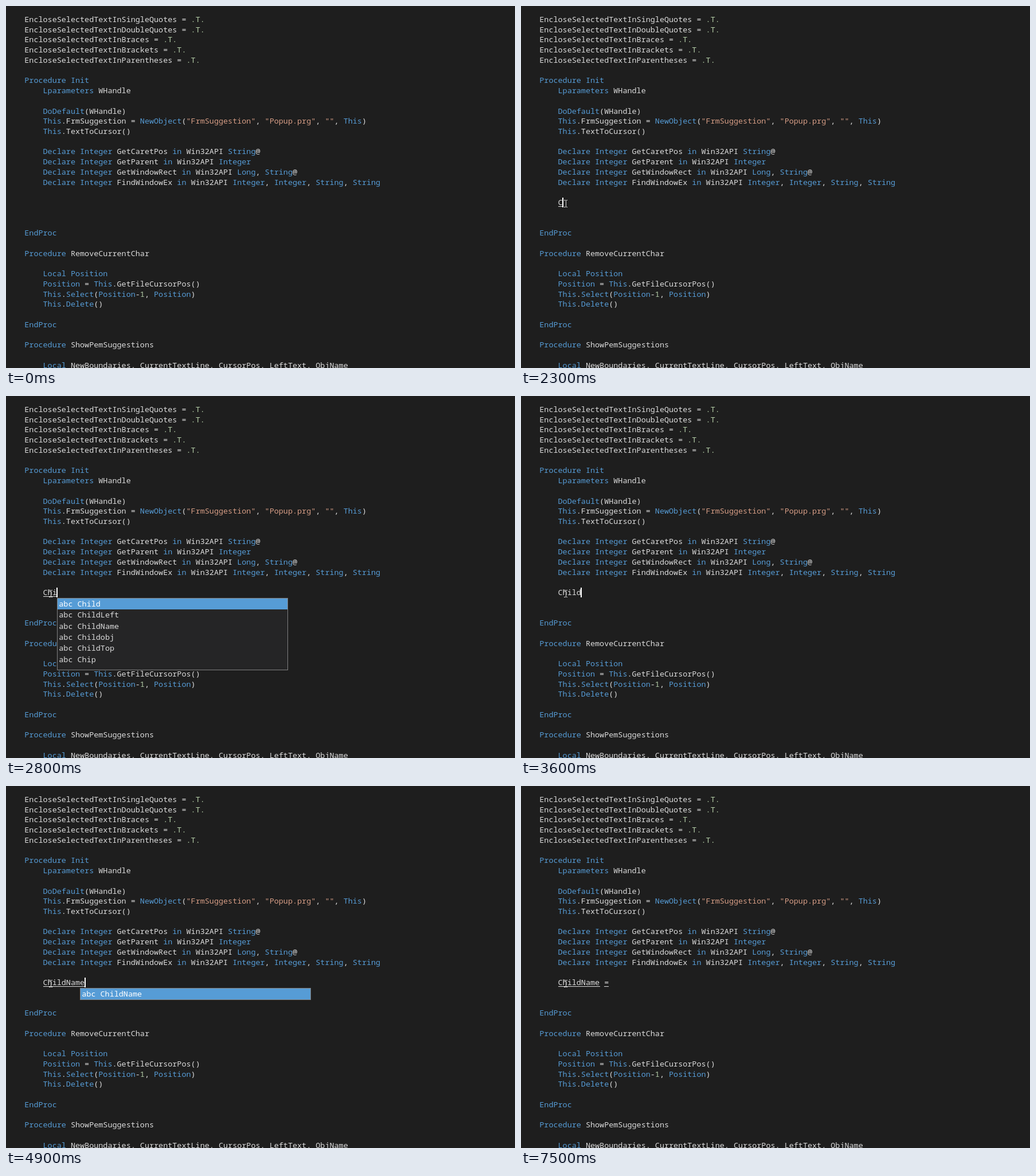
An HTML page with a canvas that plays this animation: 888x631 px, repeating every 8 s.

```html
<!DOCTYPE html>
<html lang="en">
<head>
<meta charset="utf-8">
<title>Editor autocomplete</title>
<style>
html, body { margin: 0; width: 100%; height: 100%; overflow: hidden; background: #1e1e1e; }
canvas { display: block; }
</style>
</head>
<body>
<canvas id="stage" width="888" height="631"></canvas>
<script>
const ctx = document.getElementById('stage').getContext('2d');
const LOOP = 8000, CELL = 8.064, LEFT = 32.26, PITCH = 17.73, INDENT = 64.5;
const PLAIN = '#dcdcdc', BLUE = '#569cd6', STRING = '#d69d85', NUMBER = '#b5cea8';

const code = `EncloseSelectedTextInSingleQuotes = .T.
EncloseSelectedTextInDoubleQuotes = .T.
EncloseSelectedTextInBraces = .T.
EncloseSelectedTextInBrackets = .T.
EncloseSelectedTextInParentheses = .T.

Procedure Init
    Lparameters WHandle

    DoDefault(WHandle)
    This.FrmSuggestion = NewObject("FrmSuggestion", "Popup.prg", "", This)
    This.TextToCursor()

    Declare Integer GetCaretPos in Win32API String@
    Declare Integer GetParent in Win32API Integer
    Declare Integer GetWindowRect in Win32API Long, String@
    Declare Integer FindWindowEx in Win32API Integer, Integer, String, String




EndProc

Procedure RemoveCurrentChar

    Local Position
    Position = This.GetFileCursorPos()
    This.Select(Position-1, Position)
    This.Delete()

EndProc

Procedure ShowPemSuggestions

    Local NewBoundaries, CurrentTextLine, CursorPos, LeftText, ObjName`.split('\n');

const keywords = new Set(('Procedure Init Lparameters DoDefault This NewObject Declare Integer ' +
  'in String Long EndProc Local Position Select Delete').split(' '));
const words = 'c Case Catch Ceiling cha CharRight Child ChildLeft ChildName Childobj ChildTop Chip'.split(' ');

// time, typed text, underlined [from, to], caret shown, popup column (0 = none), popup rows, first word
const states = [
  [0, '', 0, 0, 0],
  [1400, '', 0, 1, 0],
  [1900, '', 0, 0, 0],
  [2300, 'C', [0, 1], 1, 0],
  [2400, 'C', [0, 1], 1, 1, 10, 'c'],
  [2600, 'Ch', [0, 2], 1, 1, 10, 'c'],
  [2800, 'Chi', [0, 3], 1, 3, 6, 'Child'],
  [3200, 'Chil', [0, 4], 1, 3, 5, 'Child'],
  [3500, 'Child', [0, 5], 1, 0],
  [3600, 'Child', 0, 1, 0],
  [4200, 'Child', 0, 0, 0],
  [4600, 'ChildN', [0, 6], 1, 0],
  [4700, 'ChildNa', [0, 7], 1, 7, 1, 'ChildName'],
  [4800, 'ChildNam', [0, 8], 1, 8, 1, 'ChildName'],
  [4900, 'ChildName', [0, 9], 1, 8, 1, 'ChildName'],
  [5100, 'ChildName', [0, 9], 1, 9, 1, 'ChildName'],
  [5600, 'ChildName', [0, 9], 1, 0],
  [5700, 'ChildName ', [0, 9], 1, 0],
  [5800, 'ChildName =', [0, 9], 1, 0],
  [5900, 'ChildName = ', [0, 9], 1, 0],
  [6000, 'ChildName = ', [0, 9, 10, 11], 1, 0],
  [6600, 'ChildName = ', [0, 9, 10, 11], 0, 0],
  [7000, 'ChildName = ', [0, 9, 10, 11], 1, 0],
  [7500, 'ChildName = ', [0, 9, 10, 11], 0, 0]
];

function rect(x, y, w, h, color) {
  ctx.fillStyle = color;
  ctx.fillRect(x, y, w, h);
}

function write(text, x, y, color) {
  ctx.fillStyle = color;
  ctx.fillText(text, x, y);
}

function colorOf(token) {
  if (token[0] === '"') return STRING;
  if (token === '.T.' || /^\d+$/.test(token)) return NUMBER;
  return keywords.has(token) ? BLUE : PLAIN;
}

function drawCode() {
  code.forEach((line, row) => {
    const y = Math.round(28 + PITCH * row);
    for (const m of line.matchAll(/"[^"]*"|\.T\.|\w+|[^\w\s]/g))
      write(m[0], LEFT + m.index * CELL, y, colorOf(m[0]));
  });
}

function arrow(x, y, dir) {
  ctx.fillStyle = '#000';
  ctx.beginPath();
  ctx.moveTo(x - 3.5, y - 2 * dir);
  ctx.lineTo(x + 3.5, y - 2 * dir);
  ctx.lineTo(x, y + 2 * dir);
  ctx.fill();
}

function button(x, y, h) {
  rect(x, y, 14, h, '#808080');
  rect(x, y, 13, h - 1, '#fff');
  rect(x + 1, y + 1, 12, h - 2, '#f4f4f4');
}

function drawScrollbar(x, top, bottom) {
  rect(x, top, 14, bottom - top, '#f8f8f8');
  button(x, top, 14);
  button(x, top + 14, 17);
  button(x, bottom - 14, 14);
  arrow(x + 6.5, top + 7, -1);
  arrow(x + 6.5, bottom - 7, 1);
}

function drawPopup(col, rows, first) {
  const x = Math.round(INDENT + col * CELL), y = 352, w = 403, h = rows * 21;
  const scrolls = rows === 10;
  rect(x, y, w, h, '#808080');
  rect(x + 1, y + 1, w - 2, h - 2, '#252526');
  rect(x + 1, y + 1, w - 2, 19, BLUE);
  ctx.save();
  ctx.beginPath();
  ctx.rect(x + 1, y + 1, w - 2, h - 2);
  ctx.clip();
  const start = words.indexOf(first);
  words.slice(start, start + rows + (scrolls ? 1 : 0)).forEach((word, i) =>
    write('abc ' + word, x + 3.3, Math.round(367 + 19.35 * i), i ? PLAIN : '#fff'));
  ctx.restore();
  if (scrolls) drawScrollbar(x + w - 15, y + 1, y + h - 1);
}

function pointerAt(t) {
  if (t < 200) return null;
  if (t < 1100) {
    const p = Math.min(1, (Math.floor(t / 100) - 2) / 5);
    const k = 1 - (1 - p) ** 2;
    return [Math.round(14 + 64 * k), Math.round(36 + 317 * k)];
  }
  return [78, t < 1200 ? 349 : t < 1400 ? 345 : 344];
}

function drawPointer(x, y) {
  for (const edge of [y - 6, y + 6]) {
    rect(x - 3, edge, 3, 1, PLAIN);
    rect(x + 1, edge, 2, 1, PLAIN);
  }
  rect(x, y - 5, 1, 11, PLAIN);
}

function draw() {
  const t = performance.now() % LOOP;
  const [, text, lines, caret, col, rows, first] = states.findLast(s => s[0] <= t);
  rect(0, 0, 888, 631, '#1e1e1e');
  ctx.font = '13.44px "Noto Sans Mono", "DejaVu Sans Mono", monospace';
  drawCode();
  write(text, INDENT, 347, PLAIN);
  for (let i = 0; i < lines.length; i += 2)
    rect(Math.round(INDENT + lines[i] * CELL), 349, Math.round((lines[i + 1] - lines[i]) * CELL), 1, PLAIN);
  if (caret) rect(Math.round(64 + text.length * CELL), 334, 2, 17, '#fff');
  if (col) drawPopup(col, rows, first);
  const pointer = pointerAt(t);
  if (pointer) drawPointer(...pointer);
  requestAnimationFrame(draw);
}
draw();
</script>
</body>
</html>
```
